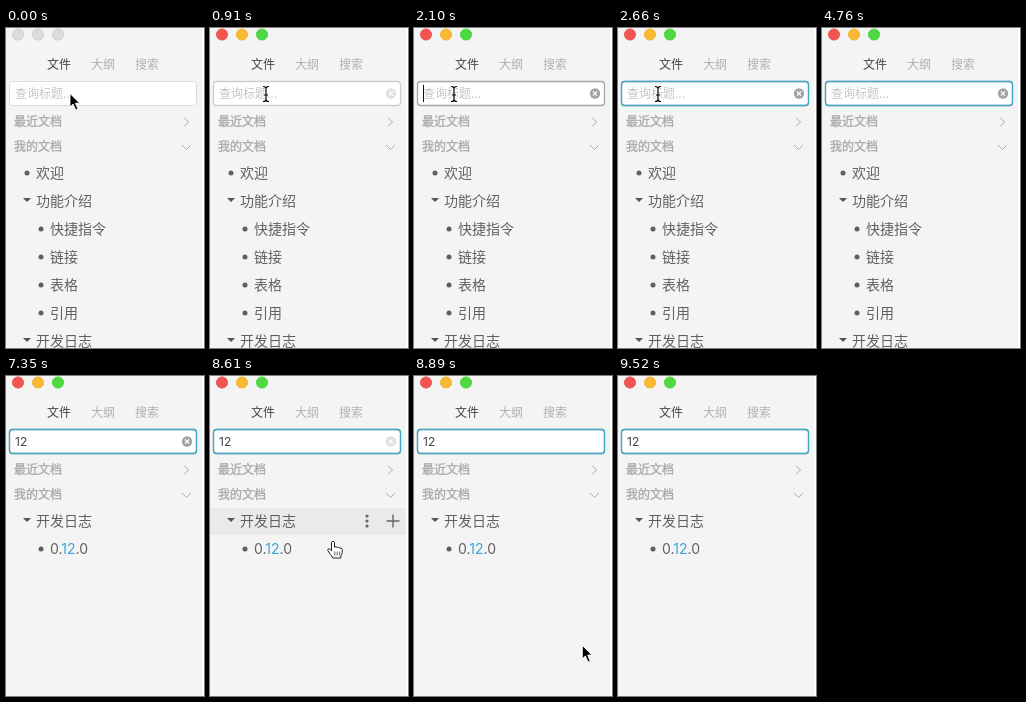
An HTML page for the animation above (9.94 s loop, 198x320 px).

```html
<!DOCTYPE html>
<html lang="zh">
<head>
<meta charset="utf-8">
<style>
html, body { margin: 0; width: 100%; height: 100%; overflow: hidden; background: #fff; }
svg { display: block; width: 198px; height: 320px; }
text { font: 12px Inter, "Noto Sans CJK SC", "Noto Sans CJK", sans-serif; white-space: pre; }
.cjk { font-family: "Noto Sans CJK SC", "Noto Sans CJK", sans-serif; }
.head { stroke: #aaa; stroke-width: .35; }
.item { font-size: 14px; fill: #606060; }
.hit { fill: #35a5dc; }
</style>
</head>
<body>
<svg id="stage" viewBox="0 0 198 320"></svg>
<script>
const LOOP = 9940, STEP = 70;
const BLINKS = [2100, 2660, 3150, 3710, 4270, 4760, 4830, 5320, 5670, 6300, 6860, 7350, 7910, 8400, 8960, 9520];
const FULL = [[0, '欢迎', 1], [0, '功能介绍'], [1, '快捷指令', 1], [1, '链接', 1], [1, '表格', 1], [1, '引用', 1], [0, '开发日志']];
const VERSIONS = ['0.12.0', '0.11.0', '0.10.0', '0.9.1', '0.8.1', '0.7.1'];
const stage = document.getElementById('stage');

const ramp = (t, a, b) => Math.min(1, Math.max(0, (t - a) / (b - a)));
const mix = (a, b, k) => a + (b - a) * k;
const label = (x, y, s, fill, style = '') =>
  `<text class="cjk ${style}" x="${x}" y="${y}" fill="${fill}">${s}</text>`;
const line = (d, color, width = 1) =>
  `<path d="${d}" fill="none" stroke="${color}" stroke-width="${width}"/>`;

function lights(active) {
  const colors = [['#f2544f', '#e64b47'], ['#fab932', '#eeac28'], ['#4fda42', '#45cd39']];
  return colors.map(([fill, edge], i) =>
    `<circle cx="${12 + 20 * i}" cy="6.5" r="5.6" fill="${active ? fill : '#dcdcdc'}" stroke="${active ? edge : '#c8c8c8'}" stroke-width=".8"/>`).join('');
}

function row([depth, name, leaf], i, query) {
  const x = 21 + 14 * depth, y = 145 + 28 * i;
  const mark = leaf
    ? `<circle cx="${x}" cy="${y}" r="2.5" fill="#606060"/>`
    : `<path d="M${x - 4} ${y - 3}h8l-4 4z" fill="#555"/>`;
  const text = query ? name.replace(query, '<tspan class="hit">$&</tspan>') : name;
  const kind = /\d/.test(name) ? '' : 'cjk';
  return mark + `<text class="item ${kind}" x="${x + 9}" y="${y + 5}">${text}</text>`;
}

function tree(query) {
  if (!query) return FULL.map((r, i) => row(r, i)).join('');
  const found = VERSIONS.filter(v => v.includes(query)).map(v => [1, v, 1]);
  return [[0, '开发日志'], ...found].map((r, i) => row(r, i, query)).join('');
}

function hoverRow(i) {
  const y = 145 + 28 * i;
  return `<rect y="${y - 13}" width="196" height="27" fill="#eaeaea"/>` +
    [-5, 0, 5].map(d => `<circle cx="157" cy="${y + d}" r="1.6" fill="#666"/>`).join('') +
    line(`M176.5 ${y}h13M183 ${y - 6.5}v13`, '#666', 1.4);
}

function searchBox(t, typed) {
  const frame = (color, alpha) =>
    `<rect x="3.5" y="53.5" width="187" height="24" rx="3" fill="none" stroke="${color}" stroke-width="1.3" opacity="${alpha}"/>`;
  const caretX = 9 + [0, 4, 12][typed.length];
  const caretOn = BLINKS.filter(b => b <= t).length % 2;
  const clear = ramp(t, 840, 1050) * (1 - ramp(t, 8400, 8720));
  return '<rect x="3.5" y="53.5" width="187" height="24" rx="3" fill="#fff" stroke="#dcdcdc"/>' +
    frame('#a6a6a6', ramp(t, 840, 1050)) + frame('#43a9c4', ramp(t, 2100, 2310)) +
    (typed ? `<text x="9" y="70" fill="#444">${typed}</text>` : label(9, 70, '查询标题...', '#c4c4c4')) +
    `<g opacity="${clear}"><circle cx="181" cy="65.5" r="5.2" fill="#a3a3a3"/>${line('M179 63.5l4 4m0-4l-4 4', '#fff', 1.2)}</g>` +
    (caretOn ? `<rect x="${caretX}" y="57" width="1" height="17" fill="#111"/>` : '');
}

const place = (x, y, s) => `<g transform="translate(${x} ${y})">${s}</g>`;
const arrow = (x, y) => place(x, y,
  '<path d="M0 0V13.5l3.1-2.9 2.6 6 2.3-1-2.6-5.9h4.3z" fill="#000" stroke="#fff" stroke-width=".9"/>');
const beam = (x, y) => {
  const d = 'M-3-7.5q3 0 3 2v11q0 2-3 2M3-7.5q-3 0-3 2v11q0 2 3 2M-2 1h4';
  return place(x, y, line(d, '#fff', 2.6) + line(d, '#000', 1.2));
};
const hand = (x, y) => place(x, y,
  `<path d="M-1.5 1.2q1.6-2.2 3 0v5q1.5-1.2 2.7.3 1.6-.8 2.6.6 2-.4 2.4 1.3v3.1q-.3 2-1.4 3.5v2H-.2q-.8-2-2.6-3.7l-2.5-4q0-2 2-1.3l1.8 1.8z"
    fill="#fff" stroke="#222" stroke-width="1" stroke-linejoin="round"/>` +
  line('M1.8 10.5v4M4.2 10.5v4M6.6 10.5v4', '#222', .7));

function pointer(t) {
  if (t < 910) return arrow(64, 65.5);
  if (t < 4760) return beam(mix(64, 40, ramp(t, 840, 1050)), 66);
  if (t < 8400 || t >= 9520) return '';
  const a = ramp(t, 8400, 8610), b = 1 - (1 - ramp(t, 8610, 8960)) ** 1.6;
  const x = mix(mix(40, 123, a), 172, b);
  const y = mix(mix(66, 165, a), 278, b) + 21 * ramp(t, 9310, 9450);
  return y < 78 ? beam(x, y) : y > 132 && y < 190 ? hand(x, y) : arrow(x, y);
}

function draw(t) {
  const typed = t < 4830 ? '' : t < 5670 ? '1' : '12';
  const query = typed === '12' && t < 5740 ? '1' : typed;
  const hover = t < 8540 || t >= 8750 ? '' : hoverRow(t < 8680 ? 0 : 1);
  stage.innerHTML = '<rect width="196" height="320" fill="#f4f4f4"/>' +
    lights(t >= 280) +
    label(41, 41, '文件', '#444') + label(85, 41, '大纲', '#b0b0b0') + label(129, 41, '搜索', '#b0b0b0') +
    label(8, 98, '最近文档', '#aaa', 'head') + line('M178 89.5l4.5 4.5-4.5 4.5', '#aaa') +
    label(8, 123, '我的文档', '#aaa', 'head') + line('M176 117l4.5 4.5 4.5-4.5', '#aaa') +
    hover + tree(query) + searchBox(t, typed) + pointer(t);
}

let last = -1;
function tick() {
  const t = Math.floor(performance.now() % LOOP / STEP) * STEP;
  if (t !== last) draw(last = t);
  requestAnimationFrame(tick);
}
tick();
</script>
</body>
</html>
```
